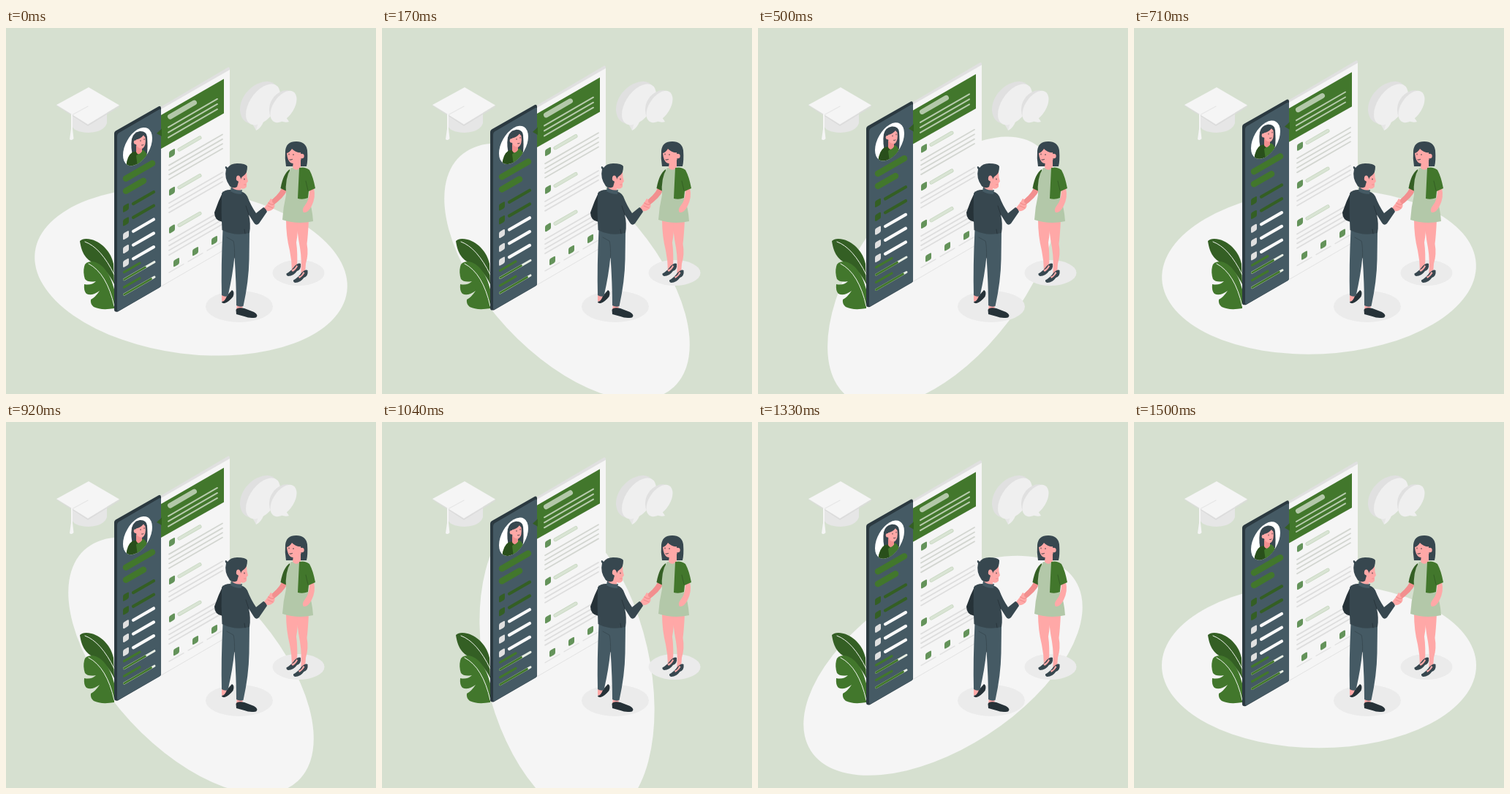
Animation of 506 by 500 pixels, one loop 1540 ms. Source, as an HTML page:

```html
<!DOCTYPE html>
<html lang="en">
<head>
<meta charset="utf-8">
<title>Handshake and resume</title>
<style>
  html, body { margin: 0; width: 100%; height: 100%; overflow: hidden; background: #d6e0d0; }
  svg { display: block; width: 100vw; height: 100vh; }
</style>
</head>
<body>
<svg viewBox="0 0 506 500" fill="none" stroke-linecap="round" stroke-linejoin="round">
  <rect width="506" height="500" fill="#d6e0d0"/>
  <ellipse id="floor" cx="253" cy="332.8" rx="215" ry="112.5" fill="#f5f5f5"/>

  <g id="cap">
    <path d="M90 112V133Q92 142 113 143Q134 142 138 130V110Z" fill="#e6e6e6"/>
    <path d="M69 105L112 132L155 106V107.5L112 134L69 106Z" fill="#dcdcdc"/>
    <path d="M69 105L113 81L155 105.500L112 131.500Z" fill="#f5f5f5"/>
    <path d="M112 107L90 119" stroke="#e6e6e6" stroke-width="1.200"/>
    <path d="M90 118V141" stroke="#f5f5f5" stroke-width="2"/>
    <path d="M89 138H91L92.500 151Q90 154.500 87 152Z" fill="#f5f5f5"/>
  </g>

  <g id="bubbles">
    <path d="M320 113C319 92 339 73 358 73Q364 73 370 79L364 112L337 131Q322 130 320 113Z" fill="#e0e0e0"/>
    <path d="M335 127L342 140L352 127Z" fill="#e6e6e6"/>
    <ellipse rx="23.500" ry="24.500" transform="matrix(1 -.577 0 1 351.500 104.500)" fill="#efefef"/>
    <path d="M345 129L342 140Q349 137 353 126Z" fill="#efefef"/>
    <path d="M360 112C360 96 373 85 385 85Q390 86 392 90L369 127Q360 124 360 112Z" fill="#e0e0e0"/>
    <ellipse rx="18" ry="19" transform="matrix(1 -.577 0 1 379.500 107.500)" fill="#efefef"/>
    <path d="M374 126Q381 130 387 128L383 122Z" fill="#efefef"/>
  </g>

  <g id="leaves">
    <path d="M101 291Q106 286 117 289C132 293 144 307 147 322L148 350Q138 329 122 322C107 316 103 304 101 291Z" fill="#345f24"/>
    <path d="M108 292Q130 300 148 337" stroke="#f0f4ee"/>
    <path d="M107 326Q108 319 118 319C132 321 143 336 148 357V383Q130 386 120 381Q115 377 116 371Q122 368 128 359Q117 367 110 363Q106 359 107 350Q117 352 123 346Q112 348 108 343Q105 334 107 326Z" fill="#42772c"/>
    <path d="M113 322Q138 335 148 380" stroke="#f0f4ee"/>
  </g>

  <ellipse cx="319" cy="380.500" rx="46" ry="21.500" fill="#ebebeb"/>
  <ellipse cx="400" cy="334.500" rx="35.500" ry="17.500" fill="#ebebeb"/>

  <g id="board">
    <path d="M212 108L304 54Q306 54 306 57V299L212.500 353Z" fill="#e0e0e0"/>
    <path d="M212 111.500L306 57.500V299L212.500 353Z" fill="#f5f5f5"/>
    <path d="M213 353L306 299" stroke="#e4e4e4"/>
    <path d="M212 119.500L298 70V117L212 165.500Z" fill="#42772c"/>
    <g id="page"></g>
    <path d="M148 144.500Q148 142 150 141L209 107.500Q211.500 106.500 212 109.500V352Q212 354 210 355L153 388Q148 389 148 385Z" fill="#2b3940"/>
    <path d="M152 148Q152 145.500 154 144L209 112Q212 110.500 212 113V352Q212 354 210 355L154 387Q152 388 152 385Z" fill="#455a64"/>
    <path d="M213 138L206 144.500L213 148.500Z" fill="#345f24"/>
    <g id="side"></g>
    <clipPath id="round"><ellipse rx="20" ry="23.500" transform="matrix(1 -.577 0 1 180 162.500)"/></clipPath>
    <g id="portrait" clip-path="url(#round)">
      <path d="M155 130H205V195H155Z" fill="#fff"/>
      <path d="M172 152Q174 143 183 141.500Q192 141 193 149Q194 162 193 172L174 178Q170 164 172 152Z" fill="#37474f"/>
      <path d="M164 195Q164 176 173 170L184 168Q194 167 196 185V195Z" fill="#294f1b"/>
      <path d="M178 175L187 167Q194 169 195 190H180Z" fill="#42772c"/>
      <path d="M178 161V170Q181 176 186 169V161Z" fill="#f28f8f"/>
      <path d="M178 153Q184 152 188 147L190.500 150Q192 161 187 165Q181 166 178 160Z" fill="#ffa8a7"/>
      <circle cx="177.500" cy="156.500" r="2.800" fill="#ffa8a7"/>
      <path d="M184 154V155M189 152V153M185.500 160.500Q187 161 188 160" stroke="#263238" stroke-width=".8"/>
    </g>
  </g>

  <g id="woman">
    <path d="M382 168Q383 155 397 155Q410 155 412 167Q413 181 411 189H383Q381 178 382 168Z" fill="#37474f"/>
    <path d="M383 262H400Q399 282 397 293Q399 308 398 326L391 333Q391 318 388 304Q383 284 383 262Z" fill="#ffa8a7"/>
    <path d="M398 262H414Q413 283 411.500 295Q414 309 410 322L409 335L403 339Q405 318 402 300Q398 280 398 262Z" fill="#ffa8a7"/>
    <path id="shoe" d="M383.500 335.500Q390 332 395 325Q400 320 403 322Q404 330 398 332Q393 339 386 339Q383 338 383.500 335.500Z" fill="#37474f"/>
    <use href="#shoe" x="9.500" y="9"/>
    <path d="M390 330.500Q394 330 397.500 324L399 325.500Q396 331 392 333Z" fill="#ffa8a7"/>
    <path d="M400 339.500Q404 339 406.500 333L408.500 334.500Q405 340 401 342Z" fill="#ffa8a7"/>
    <path d="M377 219L384 222Q380 232 364 243L358 239Q372 229 377 219Z" fill="#f28f8f"/>
    <path d="M388 193Q379 199 375.500 219L384 223L391 212Z" fill="#345f24"/>
    <path d="M390 191Q381 205 383 228Q379 245 378 262Q399 269 420 264Q419 246 413 231L406 192Z" fill="#b3c8a9"/>
    <path d="M393 182L392 191Q397 197 403 190V180Z" fill="#ffa8a7"/>
    <path d="M384 171Q388 170 391 165Q397 171 403 170L403.500 180Q398 187 390 184.500Q385 182 384 171Z" fill="#ffa8a7"/>
    <circle cx="404.500" cy="175" r="3.200" fill="#ffa8a7"/>
    <path d="M387 172V173M393 172.500V173.500M388 180Q390 180.500 391.500 179.500" stroke="#263238" stroke-width=".9"/>
    <path d="M415 221L421 219Q424 231 418 243Q413 253 407 252Q404 248 409 242Q415 235 415 221Z" fill="#ffa8a7"/>
    <path d="M401 191Q409 189 415 194Q420 203 423 219L414 223L413 232Q406 235 399 233Q400 211 401 191Z" fill="#42772c"/>
    <path d="M413 222L410 209" stroke="#345f24"/>
  </g>

  <g id="man">
    <path d="M295 363L303 364L303 371Q299 376 295 373Z" fill="#ffa8a7"/>
    <path d="M316 376H323.500V386H315Z" fill="#ffa8a7"/>
    <path d="M295 374Q300 373 302 366L309 358Q313 360 310.500 367Q305 374 299 376Q295 376 295 374Z" fill="#263238"/>
    <path d="M314.500 385Q316 381 326 383L339 388Q346 392 342 395.500Q333 397 326 394L315 391Z" fill="#263238"/>
    <path d="M296.500 275Q294 326 295 365Q299 368 303.500 366Q310 338 312.500 312Q315 350 315 379Q320 382 324.500 380Q332 346 332.500 316L333 278Z" fill="#455a64"/>
    <path d="M312.500 314Q313 298 311 291L302 286" stroke="#37474f" stroke-width=".8"/>
    <path d="M297 223Q290 237 285 252Q285 263 296 265Z" fill="#263238"/>
    <path d="M352 247L359 238L362 233Q365 234 364 238Q369 240 367 245Q363 251 357 250Z" fill="#ffa8a7"/>
    <path d="M359 239Q364 243 367 240M358 243L365 246" stroke="#f28f8f" stroke-width="1.200"/>
    <path d="M307 221Q298 221 295 226Q294 250 295.500 276Q313 285 333 280Q335 267 332 255L339 266Q342 271 346 267L357 251Q355 246 352 245L342 253Q335 243 330 230Q326 223 318 223Z" fill="#37474f"/>
    <path d="M332 255L328 243M327 281L326 275" stroke="#263238" stroke-width=".8"/>
    <path d="M309 207L316 196L329 197Q329 204 331 209.500L329 212V217Q326 221 321 219L322 225Q314 227 308 222Z" fill="#ffa8a7"/>
    <path d="M308 217Q314 223 323 221L322 227Q313 227 307 223Z" fill="#455a64"/>
    <path d="M303 191Q307 185 316 185Q328 185 330 189Q330 198 326 201Q322 203 321 207Q320 200 316 202Q313 206 318 210L316 217Q311 220 306 216Q298 205 301 193Q299 191 300 189Q302 189 303 191Z" fill="#37474f"/>
    <circle cx="317.800" cy="206" r="3" fill="#ffa8a7"/>
    <path d="M326 206V207" stroke="#263238"/>
    <path d="M325.500 214H328" stroke="#f28f8f"/>
  </g>
</svg>
<script>
const $ = id => document.getElementById(id);
const STEP = 1000 / 24, POSES = 37, LOOP = 1540;
const TURN = 1500, LEAD = 30, LIFT = 10, SLOPE = 0.577;

// Bar rising to the right along the isometric plane.
const bar = (x, y, len, color, w) =>
  `<path d="M${x} ${y}l${len} ${-len * SLOPE}" stroke="${color}" stroke-width="${w}"/>`;
const tile = (x, y, color) =>
  `<rect x="-4" y="-4.500" width="8" height="9" rx="2" transform="matrix(1 ${-SLOPE} 0 1 ${x} ${y})" fill="${color}"/>`;

function pageParts() {
  let s = bar(224.5, 121.5, 33, '#b3c8a9', 7);
  for (let i = 0; i < 3; i++) s += bar(222, 136 + i * 7, 67, '#b7cbad', 2);
  const rows = [4, 3, 4];
  rows.forEach((n, i) => {
    const y = 171.5 + i * 51.7;
    s += tile(227, y, '#64935a');
    s += bar(237, y - 5, 28, '#c5d5be', 5) + bar(237, y - 5, 28, '#d9e4d4', 3.6);
    for (let j = 0; j < n; j++)
      s += bar(223, y + 16.5 + j * 6.4, 73, i ? '#dedede' : '#d3d6d1', 1.8);
  });
  for (let i = 0; i < 3; i++) {
    s += tile(233 + i * 26, 320.5 - i * 15, '#64935a');
    s += bar(223 + i * 26, 334.5 - i * 15, 20, '#e0e0e0', 1.3);
  }
  return s;
}

function sideParts() {
  let s = bar(164, 206, 36, '#42772c', 8.5) + bar(164, 223, 24, '#42772c', 8.5);
  for (let i = 0; i < 5; i++) {
    const y = 246 + i * 18.8, dark = i < 2;
    s += tile(164, y, dark ? '#345f24' : '#e0e0e0');
    s += bar(174, y - 5.5, 28, dark ? '#345f24' : '#fafafa', 4.2);
  }
  for (let i = 0; i < 2; i++) {
    const y = 334 + i * 20.5;
    s += bar(161.5, y, 21.5, '#42772c', 3.2);
    s += bar(161.5, y + 10, 41.5, '#e8eee5', 3);
    s += bar(161.5, y + 10, i ? 37 : 29, '#42772c', 2.8);
  }
  return s;
}

$('page').innerHTML = pageParts();
$('side').innerHTML = sideParts();

// One full turn of the floor while the board rises and sinks, at 24 poses a second.
function draw(ms) {
  const pose = Math.min(POSES - 1, Math.floor((ms % LOOP + 5) / STEP));
  const p = Math.min(1, (pose * STEP + LEAD) / TURN);
  const rise = LIFT * (1 - Math.abs(2 * p - 1));
  $('floor').setAttribute('transform', `rotate(${360 * p} 253 332.8)`);
  $('board').setAttribute('transform', `translate(0 ${-rise})`);
}

const start = performance.now();
function tick(now) {
  draw(Math.max(0, now - start));
  requestAnimationFrame(tick);
}
draw(0);
requestAnimationFrame(tick);
</script>
</body>
</html>
```
